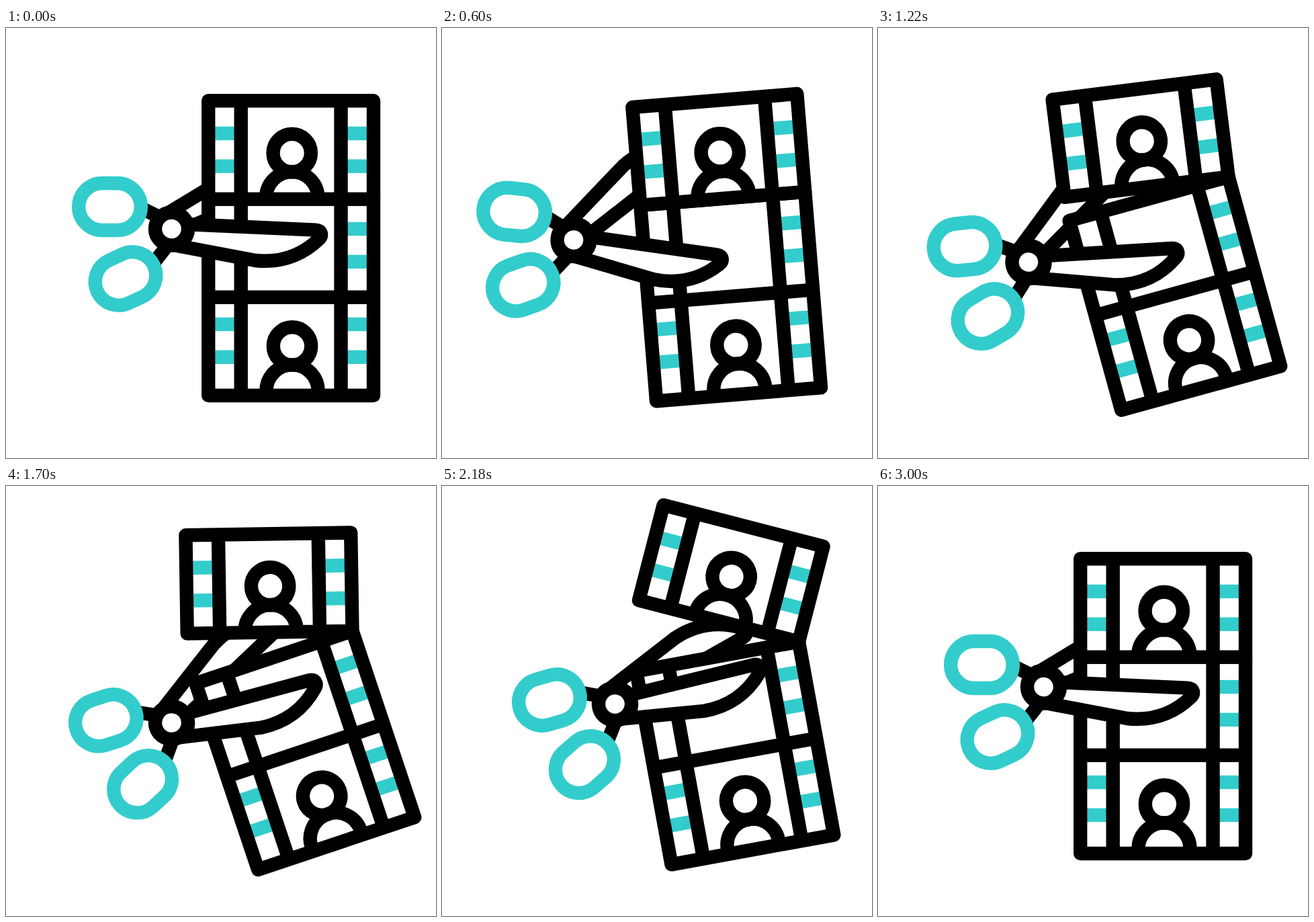
Animation of 640 by 640 pixels, one loop 3.1 s. Source, as an HTML page:

```html
<!DOCTYPE html>
<html lang="en">
<head>
<meta charset="utf-8">
<title>Film cutting</title>
<style>
  html, body { margin: 0; width: 100%; height: 100%; overflow: hidden; background: #fff; }
  svg { display: block; width: 100vw; height: 100vh; }
  .line { fill: none; stroke: #000; stroke-width: 20.4; stroke-linejoin: round; }
  .solid { fill: #fff; }
  .handle { stroke: #3cc; }
  .hole { fill: #3cc; }
</style>
</head>
<body>
<svg viewBox="0 0 640 640">
  <defs>
    <path id="blade" class="line solid"
      d="M15 -7.2 L214.5 1.6 C223.5 2 224.5 10 219.5 15 C194.5 39 162.5 51 124.5 47 L3.5 24 Z"/>
    <g id="person" class="line">
      <circle r="28.2"/>
      <path d="M-38.6 66.6 A38.6 38.6 0 0 1 38.6 66.6"/>
    </g>
    <rect id="grip" class="line handle" x="-46.3" y="-35" width="92.6" height="70" rx="35"/>
  </defs>
  <g id="backBlade"><use href="#blade" transform="scale(1 -1)"/></g>
  <g id="film">
    <g id="lower"></g>
    <g id="upper"></g>
  </g>
  <g id="scissors">
    <use href="#blade"/>
    <path class="line" stroke-linecap="round" d="M-45.5 -31 L-15 -16 M-24.5 48 L-6.5 25"/>
    <circle class="line solid" r="24.5"/>
    <use href="#grip" transform="translate(-92 -33)"/>
    <use href="#grip" transform="translate(-68.5 74) rotate(-25)"/>
  </g>
</svg>
<script>
const LOOP = 3100, MOVING = 3000, STEP = 20;
const LEFT = 301.2, RIGHT = 547, TOP = 108.2, CUT = 254.6, BOTTOM = 547;
const el = id => document.getElementById(id);

const hole = (x, y) => `<rect class="hole" x="${x}" y="${y}" width="30" height="20.4"/>`;
const holes = (x, y) => hole(x, y) + hole(x, y + 48.8);
const person = (x, y) => `<use href="#person" x="${x}" y="${y}"/>`;
const piece = (y1, y2, inside, extra = '') => `
  <rect x="${LEFT}" y="${y1}" width="${RIGHT - LEFT}" height="${y2 - y1}" fill="#fff"/>
  ${inside}
  <path class="line" d="M${LEFT} ${y1} H${RIGHT} V${y2} H${LEFT} Z M349.7 ${y1} V${y2} M498.5 ${y1} V${y2} ${extra}"/>`;

el('upper').innerHTML = piece(TOP, CUT,
  holes(310.5, 146.7) + holes(508, 146.7) + person(425.7, 186));
el('lower').innerHTML = piece(CUT, BOTTOM,
  holes(508, 288.8) + holes(310.5, 430.8) + holes(508, 430.8) + person(426, 473.4),
  `M${LEFT} 400.8 H${RIGHT}`);

// A periodic swing that leaves zero and returns to it at rest:
// two even waves (slow, quick) and two odd ones (broad, sharp).
const swing = (phase, slow, quick, broad, sharp) =>
  slow * (1 - Math.cos(phase)) +
  quick * (1 - Math.cos(2 * phase)) +
  broad * (2 * Math.sin(phase) - Math.sin(2 * phase)) +
  sharp * Math.sin(phase) ** 3;

function draw(t) {
  const phase = 2 * Math.PI * Math.min(t / MOVING, 1);
  const move = (...waves) => swing(phase, ...waves);
  const set = (id, value) => el(id).setAttribute('transform', value);

  const tilt = move(9.29, -0.7, -0.63, 0.4);
  const bend = move(6.75, 2.53, -2.15, -7.47);
  const x = 246.5 + move(-1.96, -11.24, -3.59, -28);
  const y = 299 + move(28.13, -2.61, -0.46, 2.78);
  const turn = move(-7.11, 1.44, 2.66, 5);
  const open = 20.5 - move(-4.01, -1.99, -2.91, -11.98);

  set('film', `rotate(${-tilt} 412 332)`);
  set('upper', `rotate(${bend} ${RIGHT} ${CUT})`);
  set('scissors', `translate(${x} ${y}) rotate(${turn})`);
  set('backBlade', `translate(${x} ${y}) rotate(${turn - open})`);
}

let start;
function tick(now) {
  start ??= now;
  draw(Math.floor((now - start) % LOOP / STEP) * STEP);
  requestAnimationFrame(tick);
}
draw(0);
requestAnimationFrame(tick);
</script>
</body>
</html>
```
